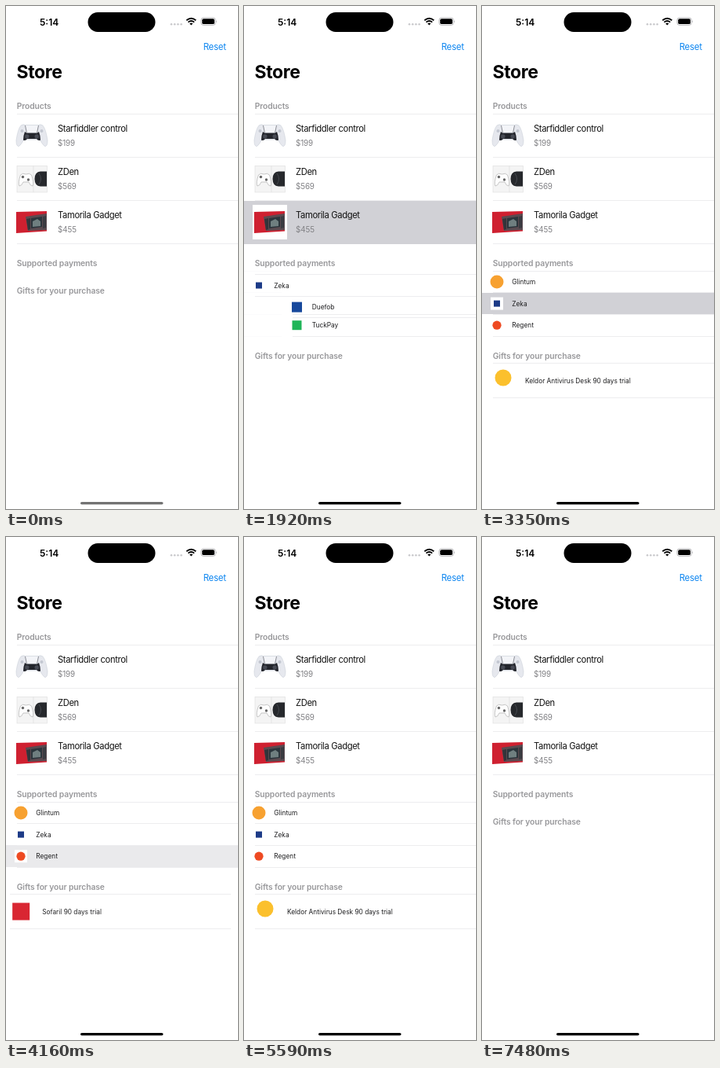
Recreate the animation shown at these times as an HTML page. Size 296 px wide and 640 px high, loop 7590 ms.

```html
<!DOCTYPE html>
<html lang="en">
<head>
<meta charset="utf-8">
<title>Store</title>
<style>
html, body { margin: 0; width: 100%; height: 100%; overflow: hidden; background: #fff; }
svg { display: block; width: 296px; height: 640px; font-family: Inter, "Liberation Sans", sans-serif; }
.time { font-size: 12px; font-weight: 600; }
.title { font-size: 23px; font-weight: 700; letter-spacing: -.35px; }
.reset { font-size: 11.4px; letter-spacing: -.25px; fill: #0a84f0; }
.header { font-size: 10.3px; font-weight: 600; letter-spacing: -.09px; fill: #98989b; }
.name { font-size: 11.2px; letter-spacing: -.35px; fill: #111; }
.price { font-size: 9.8px; letter-spacing: -.1px; fill: #808084; }
.small { font-size: 8.3px; fill: #1c1c1e; }
.rule { stroke: #ededef; shape-rendering: crispEdges; }
.mark { fill: #d1d1d6; opacity: 0; shape-rendering: crispEdges; }
</style>
</head>
<body>
<svg id="stage" viewBox="0 0 296 640">
  <text class="time" x="43" y="24.5">5:14</text>
  <rect x="104.5" y="8" width="86" height="25" rx="12.5"/>
  <g fill="#c9c9cc">
    <circle cx="211" cy="23.2" r="1.3"/><circle cx="215.2" cy="23.2" r="1.3"/>
    <circle cx="219.4" cy="23.2" r="1.3"/><circle cx="223.6" cy="23.2" r="1.3"/>
  </g>
  <g fill="none" stroke="#000" stroke-width="1.8">
    <path d="M230.3 18.2Q236.3 13.2 242.3 18.2M232.4 20.6Q236.3 17.4 240.2 20.6"/>
    <path d="M234.2 22.2Q236.3 20.6 238.4 22.2L236.3 24.4Z" fill="#000" stroke="none"/>
  </g>
  <rect x="248.9" y="15" width="18.4" height="9.4" rx="3" fill="#fff" stroke="#a8a8ab" stroke-width=".8"/>
  <rect x="250.2" y="16.3" width="15.8" height="6.8" rx="1.9"/>
  <path d="M268.4 18.2q1.4 1.5 0 3z" fill="#a8a8ab"/>
  <text class="reset" id="reset" x="251.7" y="56">Reset</text>
  <text class="title" x="13.5" y="92">Store</text>
  <text class="header" x="13.7" y="131.3">Products</text>
  <text class="header" x="13.7" y="331.3">Supported payments</text>
  <text class="header" id="gifts" x="13.7">Gifts for your purchase</text>
  <g id="rows"></g>
  <rect id="home" x="95" y="631" width="105.5" height="3.2" rx="1.6"/>
</svg>
<script>
const LOOP = 7590, WIDTH = 296, ROW = 27.6, SLIDE = 300;
const $ = id => document.getElementById(id);

const pad = `
  <path d="M8 9Q11 7 14 8.5H30Q33 7 36 9Q40 14 42 28Q42 36 38.5 35.5Q36 34 32 27H12Q8 34 5.5 35.5Q2 36 2 28Q4 14 8 9Z" fill="#e6e8ee" stroke="#ccd0d9" stroke-width=".6"/>
  <path d="M13 17L16 19H28L31 17Q33 22 33 27.5Q30 29 28 26H16Q14 29 11 27.5Q11 22 13 17Z" fill="#23252c"/>
  <path d="M13.5 9L15.5 18.5H28.5L30.5 9" fill="#f3f4f8" stroke="#4a4d57" stroke-width=".6"/>
  <circle cx="15.8" cy="23" r="2.7" fill="#474a54"/><circle cx="28.2" cy="23" r="2.7" fill="#474a54"/>
  <circle cx="9.5" cy="16" r="2" fill="#c3c7d1"/><circle cx="34.5" cy="16" r="2" fill="#c3c7d1"/>`;
const whiteBox = `
  <rect x="3" y="5.5" width="38.5" height="33.5" fill="#f4f4f4" stroke="#dcdcdc" stroke-width=".6"/>
  <path d="M24 5.5V39" stroke="#dadada" stroke-width=".6"/>
  <path d="M7.5 17Q10 14 14.5 16Q19 14 21.5 17Q25 27 23 31Q20 31 18 26H11Q9 31 6 31Q4 27 7.5 17Z" fill="#fdfdfd" stroke="#b0b0b0" stroke-width=".7"/>
  <circle cx="10.5" cy="19.5" r="1.7" fill="#666"/><circle cx="17.5" cy="23" r="1.7" fill="#666"/>
  <path d="M41 12.5H33Q25.5 13 25.5 22T33 31.5H41Z" fill="#26282c"/>
  <path d="M31 15Q36 22 31 29" fill="none" stroke="#46494e"/>`;
const redBox = `
  <path d="M2 9L41 8V33.5L2 36Z" fill="#cf2030"/>
  <path d="M14 15L41 11V32L17 33Z" fill="#5a4a50"/>
  <path d="M15 18L20 17V31L17 32Z" fill="#33343a"/>
  <path d="M21 17L35 15V28L21 30Z" fill="#2b353c"/>
  <path d="M23 21L29 18L33 21V27L23 28Z" fill="#6f7f80"/>
  <path d="M36 15L40 14V29L36 30Z" fill="#3a3b41"/>`;

const dot = (r, color) => `<circle cx="19" r="${r}" fill="${color}"/>`;
const box = (s, color) => `<rect x="${19 - s / 2}" y="${-s / 2}" width="${s}" height="${s}" fill="${color}"/>`;
const rule = y => `<path class="rule" d="M14 ${y}H296"/>`;

// Each row group has its origin at its vertical centre.
function addRow(id, height, content) {
  const h = height / 2;
  $('rows').insertAdjacentHTML('beforeend', `<g id="${id}">${rule(-h)}${rule(h)}
    <rect class="mark" y="${-h}" width="296" height="${height}"/>${content}</g>`);
}

const place = (id, x, y) => $(id).setAttribute('transform', `translate(${x} ${y})`);

[
  ['pad', 'Starfiddler control', 199, pad],
  ['console', 'ZDen', 569, whiteBox],
  ['handheld', 'Tamorila Gadget', 455, redBox]
].forEach(([id, name, price, art], i) => {
  addRow(id, 55, `<g transform="translate(11 -22)"><rect width="44" height="44" fill="#fff"/>${art}</g>
    <text class="name" x="66" y="-4.7">${name}</text>
    <text class="price" x="66" y="12.5">$${price}</text>`);
  place(id, 0, 165 + 55 * i);
});

[
  ['coin', 'Glintum', dot(8.5, '#f7a131')],
  ['regent', 'Regent', dot(5.6, '#ee4a22')],
  ['duefob', 'Duefob', box(13, '#17489c')],
  ['tuck', 'TuckPay', box(12, '#20b559')],
  ['zeka', 'Zeka', box(8, '#1d3b87')]
].forEach(([id, name, icon]) => addRow(id, ROW,
  `<rect x="11" y="-8" width="16" height="16" fill="#fff"/>${icon}<text class="small" x="38.3" y="3">${name}</text>`));

[
  ['shield', 'Keldor Antivirus Desk 90 days trial', '<circle cx="27" cy="-3.5" r="10.5" fill="#fbc02d"/>'],
  ['film', 'Sofaril 90 days trial', '<rect x="17" y="-11" width="22" height="22" fill="#d8202c"/>']
].forEach(([id, name, icon]) => addRow(id, 44, `${icon}<text class="small" x="55" y="3">${name}</text>`));

// Bursts of screen updates: first, last, count.
const bursts = [
  [0, 0, 1], [580, 580, 1], [720, 720, 1], [870, 1570, 7], [1700, 2370, 7], [2480, 2590, 2],
  [2740, 3200, 5], [3350, 3580, 3], [3720, 4380, 7], [4490, 5170, 7], [5270, 5590, 4],
  [5810, 6390, 6], [6550, 7240, 7], [7350, 7480, 2]
];
const ticks = bursts.flatMap(([from, to, n]) => Array.from({ length: n }, (_, i) =>
  Math.floor((from + (n > 1 ? (to - from) * i / (n - 1) : 0)) / 10) * 10));

const payments = [
  [0, []],
  [1010, ['zeka', 'duefob', 'tuck']],
  [1843, ['coin', 'zeka', 'regent']],
  [5840, ['zeka', 'duefob', 'tuck']],
  [6780, []]
];
const gifts = [
  [0, []], [2830, ['shield']], [3891, ['film']], [4660, ['shield']], [5840, []]
];
// Row, press, fade start, fade end.
const taps = [
  ['console', 870, 1010, 1500], ['handheld', 1700, 1930, 2370],
  ['coin', 2740, 2870, 3200], ['zeka', 3350, 3470, 3580],
  ['regent', 3720, 3891, 4380], ['zeka', 4490, 4660, 5100],
  ['coin', 5270, 5380, 5590], ['console', 5810, 5850, 6230]
];

const clamp = (v, lo = 0, hi = 1) => Math.min(hi, Math.max(lo, v));
const ramp = (t, from, to) => clamp((t - from) / (to - from));
const ease = u => u * u * (3 - 2 * u);

function phase(list, t) {
  const k = list.findLastIndex(([at]) => at <= t);
  return {
    before: k ? list[k - 1][1] : [],
    after: list[k][1],
    p: ease(ramp(t, list[k][0], list[k][0] + SLIDE))
  };
}

// New rows fade in from the left, removed rows leave to the right.
function layRows(ids, { before, after, p }, top, height) {
  const kept = before.find(id => after.includes(id));
  const shift = kept ? after.indexOf(kept) - before.indexOf(kept) : 0;
  for (const id of ids) {
    const a = before.indexOf(id), b = after.indexOf(id);
    const shown = b >= 0 || (a >= 0 && p < 1);
    const { style } = $(id);
    style.display = shown ? '' : 'none';
    style.opacity = a < 0 ? p : 1;
    if (!shown) continue;
    let x = 0, slot = b;
    if (a < 0) x = -WIDTH * (1 - p);
    else if (b < 0) {
      x = WIDTH * p;
      slot = clamp(a + shift * p, 0, 2);
    } else slot = a + (b - a) * p;
    place(id, x, top + slot * height);
  }
}

const marks = new Map([...new Set(taps.map(([id]) => id))].map(id => [id, $(id).querySelector('.mark')]));

function draw(t) {
  const pay = phase(payments, t);
  layRows(['coin', 'regent', 'duefob', 'tuck', 'zeka'], pay, 351, ROW);
  layRows(['shield', 'film'], phase(gifts, t), 476.5, 0);

  const open = pay.before.length + (pay.after.length - pay.before.length) * pay.p;
  $('gifts').setAttribute('y', 365.8 + open * ROW);

  marks.forEach(el => { el.style.opacity = 0; });
  for (const [id, on, from, to] of taps)
    if (t >= on && t < to) marks.get(id).style.opacity = 1 - ramp(t, from, to);

  const grey = Math.round(115 * (1 - ramp(t, 480, 980)));
  $('home').setAttribute('fill', `rgb(${grey},${grey},${grey})`);
  $('reset').style.opacity = t < 6550 ? 1 : .25 + .75 * ramp(t, 6900, 7480);
}

const start = performance.now();
let last = -1;
function tick() {
  const t = (performance.now() - start) % LOOP;
  const now = ticks.findLast(v => v <= t);
  if (now !== last) draw(last = now);
  requestAnimationFrame(tick);
}
tick();
</script>
</body>
</html>
```
